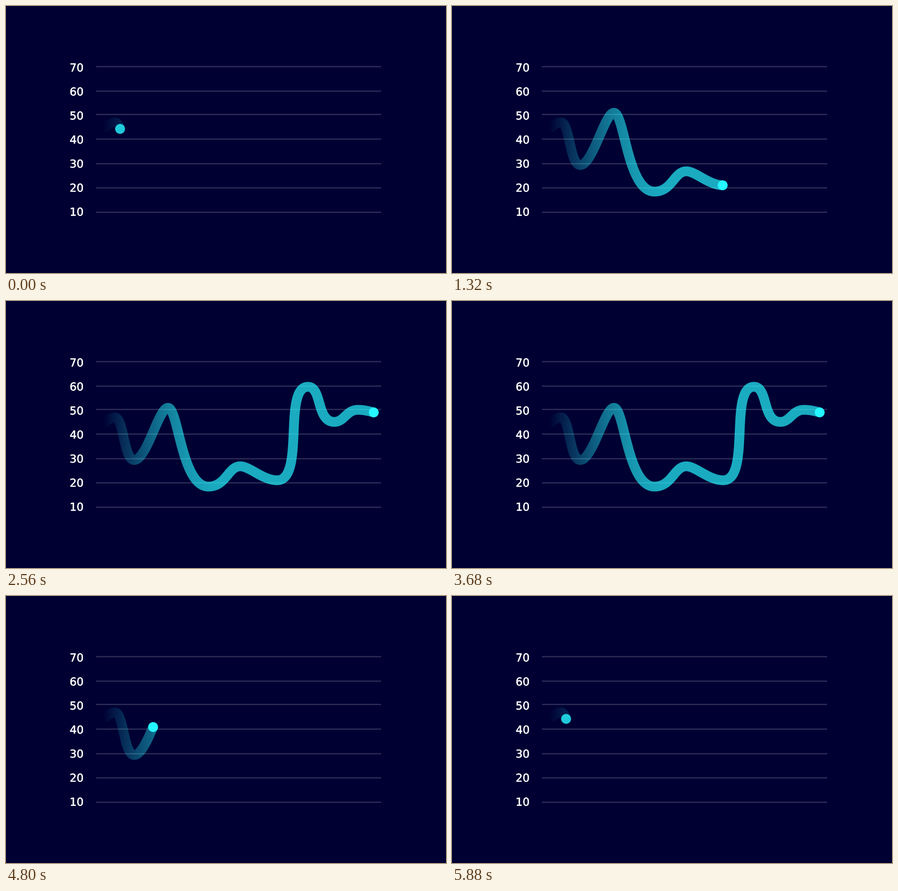
Animation of 800x487 px, one loop 7000 ms. Source, as a matplotlib script:

```python
import numpy as np
import matplotlib.pyplot as plt
from matplotlib.animation import FuncAnimation
from matplotlib.patches import Circle
from matplotlib import patheffects

W, H, DPI = 800, 487, 100
PX = 72 / DPI
FRAMES, STEP = 175, 40
BG = "#000033"
CYAN = np.array([38, 246, 255]) / 255
RADIUS = 9
HALF = 8.9

# Turning points of the curve: x, y, and how far the level handles reach
# to the left and to the right
TURNS = np.array([
    (181, 221, 0, 0),
    (198, 212.3, 8, 16),
    (233, 290, 19, 23),
    (294.5, 194.8, 17, 19),
    (368, 338.5, 49, 32),
    (426, 301.5, 22, 17),
    (493, 327, 26, 51),
    (549, 156.5, 46, 26),
    (597, 220.5, 33, 18),
    (640, 198.5, 21, 14),
    (669.5, 203.5, 0, 0),
])


def cubic(a, b, c, d, u):
    v = 1 - u
    return v**3 * a + 3 * v**2 * u * b + 3 * v * u**2 * c + u**3 * d


def build_path():
    """Points along the curve, half a pixel apart, and their arc lengths."""
    u = np.linspace(0, 1, 300)
    parts = [np.c_[cubic(x0, x0 + out, x1 - back, x1, u), cubic(y0, y0, y1, y1, u)]
             for (x0, y0, _, out), (x1, y1, back, _) in zip(TURNS, TURNS[1:])]
    pts = np.vstack(parts)
    s = np.r_[0, np.cumsum(np.hypot(*np.diff(pts, axis=0).T))]
    even = np.arange(0, s[-1], 0.5)
    return np.c_[np.interp(even, s, pts[:, 0]), np.interp(even, s, pts[:, 1])], even


def ease(t, x1, x2):
    """Ease curve with flat ends; x1 and x2 are the handle positions."""
    u = np.linspace(0, 1, 1000)
    return np.interp(t, cubic(0, x1, x2, 1, u), cubic(0, 0, 1, 1, u))


def progress(ms):
    if ms < 3640:
        return ease(min(ms / 2600, 1), 0.185, 0.67)
    return 1 - ease(min((ms - 3640) / 2240, 1), 0.37, 0.11)


path, arc = build_path()
first = arc[np.argmin(np.hypot(path[:, 0] - 208, path[:, 1] - 224))]

# Distance to the curve and position along it, for every pixel near it
dist = np.full((H, W), 1e3)
along = np.zeros((H, W))
for (cx, cy), s in zip(path, arc):
    x0, y0 = int(cx) - 12, int(cy) - 12
    yy, xx = np.mgrid[y0:y0 + 25, x0:x0 + 25]
    box = np.s_[y0:y0 + 25, x0:x0 + 25]
    d = np.hypot(xx + 0.5 - cx, yy + 0.5 - cy)
    near = d < dist[box]
    dist[box][near] = d[near]
    along[box][near] = s

# The trail fades in from the left
shade = 0.7 * np.sin(np.pi / 2 * np.clip((np.arange(W) - 175) / 225, 0, 1))
ribbon = np.clip(HALF + 0.5 - dist, 0, 1) * shade

fig = plt.figure(figsize=(W / DPI, H / DPI), dpi=DPI, facecolor=BG)
ax = fig.add_axes([0, 0, 1, 1])
ax.set_xlim(0, W)
ax.set_ylim(H, 0)
ax.axis("off")

bold = [patheffects.withStroke(linewidth=0.4 * PX, foreground="white")]
for i, y in enumerate([110.6, 155.3, 197.8, 242.7, 287.7, 331.7, 376.2]):
    ax.plot([163.5, 682], [y, y], color="white", alpha=0.2, lw=2 * PX,
            solid_capstyle="butt", snap=False, zorder=1)
    ax.text(141.3, 119.4 + 43.85 * i, str(70 - 10 * i), color="white",
            family="DejaVu Sans", size=20 * PX, ha="right",
            va="baseline", path_effects=bold)

rgba = np.zeros((H, W, 4))
rgba[..., :3] = CYAN
trail = ax.imshow(rgba, extent=(0, W, H, 0), interpolation="nearest",
                  aspect="auto", zorder=2)
dot = ax.add_patch(Circle((0, 0), RADIUS, fc=CYAN, lw=0, zorder=3))


def draw(frame):
    s = first + (arc[-1] - first) * progress(frame * STEP)
    glow = 0.82 + 0.18 * min((s - first) / 30, 1)
    rgba[..., 3] = ribbon * np.clip(s - along + 0.5, 0, 1) * glow
    trail.set_data(rgba)
    dot.center = np.interp(s, arc, path[:, 0]), np.interp(s, arc, path[:, 1])
    dot.set_alpha(glow)
    return trail, dot


anim = FuncAnimation(fig, draw, frames=FRAMES, interval=STEP,
                     repeat=True, repeat_delay=0, blit=False)
plt.show()
```
